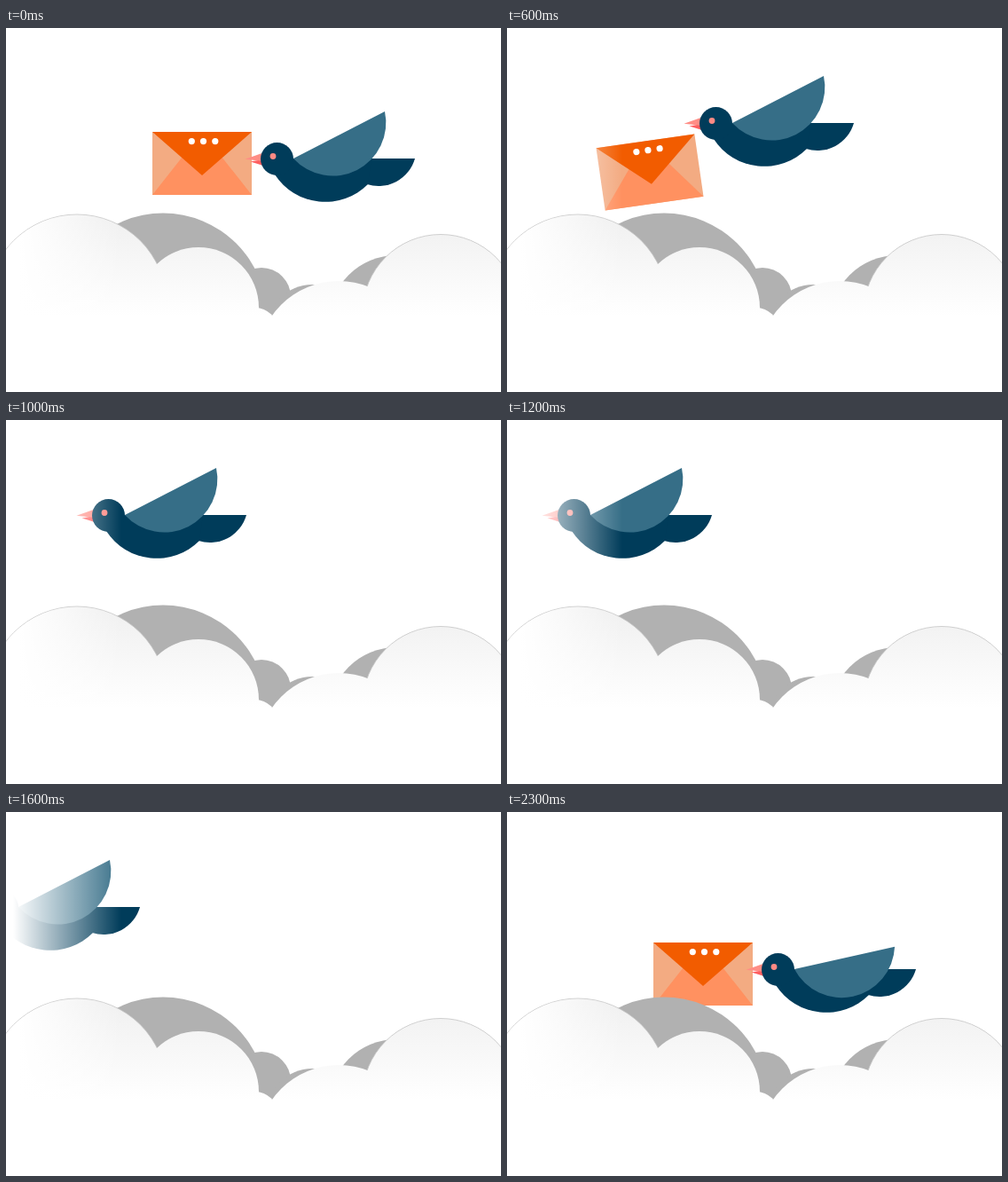
Animation, 558 px wide and 410 px high, one loop 2.4 s. Source, as an HTML page:

```html
<!DOCTYPE html>
<html lang="en">
<head>
<meta charset="utf-8">
<title>Bird with a letter</title>
<style>
  html, body { margin: 0; width: 100%; height: 100%; overflow: hidden; background: #fff; }
  svg { display: block; width: 558px; height: 410px; }
</style>
</head>
<body>
<svg viewBox="0 0 558 410">
  <defs>
    <linearGradient id="mist" gradientUnits="userSpaceOnUse" x1="8" y1="0" x2="130" y2="0">
      <stop offset="0" stop-color="#fff"/>
      <stop offset="1" stop-color="#fff" stop-opacity="0"/>
    </linearGradient>
    <linearGradient id="puff" gradientUnits="userSpaceOnUse" x1="0" y1="215" x2="0" y2="325">
      <stop offset="0" stop-color="#f0f0f0"/>
      <stop offset="1" stop-color="#fff"/>
    </linearGradient>
    <linearGradient id="glow" gradientUnits="userSpaceOnUse" x1="15" y1="0" x2="130" y2="0">
      <stop offset="0" stop-color="#fff"/>
      <stop offset="1" stop-color="#fff" stop-opacity="0"/>
    </linearGradient>
  </defs>

  <g id="letter">
    <path fill="#f3ab82" d="M165 117H277V188H165Z"/>
    <path fill="#ff9160" d="M165 188L221 117L277 188Z"/>
    <path fill="#f25c00" d="M165 117H277L221 166Z"/>
    <g fill="#fff">
      <circle cx="209.3" cy="127.6" r="3.6"/>
      <circle cx="222.5" cy="127.6" r="3.6"/>
      <circle cx="235.8" cy="127.6" r="3.6"/>
    </g>
  </g>

  <g id="bird">
    <path fill="#ff5f60" d="M275.5 150.5L290 148V155Z"/>
    <path fill="#ff8d85" d="M269.5 147.8L290 140.5V150Z"/>
    <g fill="#003c5a">
      <path d="M461 147A42.6 42.6 0 0 1 407 176L400 147Z"/>
      <path d="M303 165A68 68 0 0 0 408 176L412 147H324Z"/>
      <circle cx="305.5" cy="147.5" r="18.5"/>
    </g>
    <circle cx="301" cy="144.5" r="3.4" fill="#ff8a84"/>
    <path id="wing" fill="#366e87" d="M324 147L427 94A60 60 0 0 1 324 147Z"/>
  </g>

  <rect width="130" height="410" fill="url(#mist)"/>

  <g fill="#b1b1b1">
    <circle cx="177" cy="325.5" r="117"/>
    <circle cx="288" cy="303" r="33"/>
    <circle cx="345" cy="340" r="51"/>
    <circle cx="440" cy="332" r="76"/>
  </g>

  <g fill="url(#puff)">
    <circle cx="80" cy="311" r="101" stroke="#c4c4c4" stroke-width=".8"/>
    <circle cx="80" cy="311" r="100.6" fill="url(#glow)"/>
    <circle cx="490" cy="320.5" r="88" stroke="#c4c4c4" stroke-width=".8"/>
    <circle cx="217" cy="315" r="68"/>
    <circle cx="281" cy="340" r="25"/>
    <circle cx="375" cy="377" r="92"/>
  </g>
  <rect y="324" width="558" height="86" fill="#fff"/>
</svg>

<script>
  const STEP = 100, STEPS = 24;
  const RISE_FROM = 21, DROP_AT = 6, LANDED = 11;
  const startX = [0, 0, 0, -20, -40, -60, -70, -110, -150];
  const [letter, bird, wing] = ['letter', 'bird', 'wing'].map(id => document.getElementById(id));

  function birdPosition(i) {
    if (i >= RISE_FROM) return [0, 30 * (STEPS - i)];
    const last = startX.length - 1;
    const x = i <= last ? startX[i] : startX[last] - 20 * (i - last);
    return [x, -Math.min(40, 30 * i)];
  }

  function place(node, transform) {
    node.setAttribute('visibility', transform ? 'visible' : 'hidden');
    if (transform) node.setAttribute('transform', transform);
  }

  function draw(ms) {
    const i = Math.floor(ms / STEP) % STEPS;
    const carrying = i < DROP_AT || i >= RISE_FROM;
    const flight = `translate(${birdPosition(i)})`;
    const fall = `translate(-60 ${10 + 30 * (i - DROP_AT)}) rotate(-8.2 221 152.5)`;

    place(bird, i === RISE_FROM - 1 ? null : flight);
    place(letter, carrying ? flight : i < LANDED ? fall : null);
    wing.setAttribute('transform', `rotate(${carrying && i % 2 ? 14.7 : 0} 324 147)`);
  }

  const start = performance.now();
  function tick() {
    draw(performance.now() - start);
    requestAnimationFrame(tick);
  }
  draw(0);
  requestAnimationFrame(tick);
</script>
</body>
</html>
```
